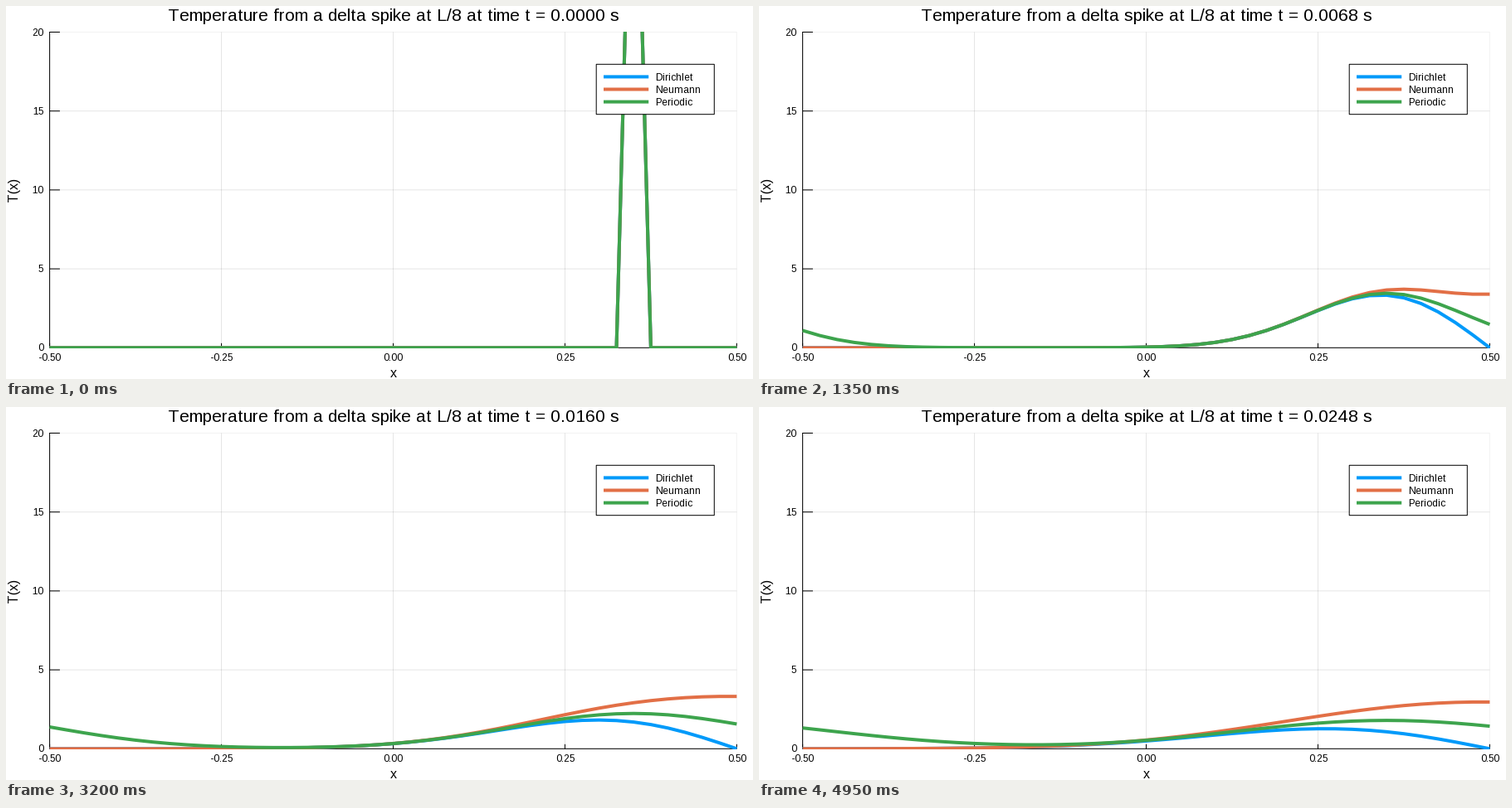
Write a matplotlib script that moves like this. It is 900 by 450 pixels and loops after 5000 ms.

```python
import numpy as np
import matplotlib.pyplot as plt
from matplotlib.animation import FuncAnimation
from matplotlib.patches import Rectangle

W, H, DPI = 900, 450, 72
FRAMES, INTERVAL = 100, 50
LEFT, RIGHT, TOP, BOTTOM = 52.6, 880.4, 31.5, 412.3
Y_MAX = 20
STEP = 0.00025          # simulated seconds per frame
POINTS, SPIKE = 41, 34
DX = 1 / (POINTS - 1)

TITLE, GUIDE, TICK = 21, 16, 12
SERIES = {"Dirichlet": "#009afa", "Neumann": "#e26f46", "Periodic": "#3da44d"}

# Whole-pixel letter advances without kerning.
plt.rcParams.update({
    "font.family": "Liberation Sans",
    "text.kerning_factor": 6,
    "text.hinting": "force_autohint",
    "text.hinting_factor": 1,
})


def px(x):
    return LEFT + (x + 0.5) * (RIGHT - LEFT)


def py(y):
    return BOTTOM - y / Y_MAX * (BOTTOM - TOP)


def laplacian(n, corner=-2, wrap=0):
    m = -2 * np.eye(n) + np.eye(n, k=1) + np.eye(n, k=-1)
    m[0, 0] = m[-1, -1] = corner
    m[0, -1] = m[-1, 0] = wrap
    return m / DX**2


def diffuse(matrix, start):
    """Return u(n), the unit spike after n Crank-Nicolson steps."""
    values, vectors = np.linalg.eigh(matrix)
    growth = (1 + values * STEP / 2) / (1 - values * STEP / 2)
    weights = vectors[start] / DX
    return lambda n: vectors @ (growth**n * weights)


inner = POINTS - 2
fixed = diffuse(laplacian(inner), SPIKE - 1)
closed = diffuse(laplacian(inner, corner=-1), SPIKE - 1)
ring = diffuse(laplacian(POINTS, wrap=1), SPIKE)

SOLVERS = {
    "Dirichlet": lambda n: np.pad(fixed(n), 1),
    "Neumann": lambda n: np.pad(closed(n), 1, mode="edge"),
    "Periodic": ring,
}

fig = plt.figure(figsize=(W / DPI, H / DPI), dpi=DPI, facecolor="white")
ax = fig.add_axes([0, 0, 1, 1])
ax.set_xlim(0, W)
ax.set_ylim(H, 0)
ax.axis("off")


def segment(x, y, color="black", width=1, **kw):
    return ax.plot(x, y, color=color, lw=width, snap=False,
                   solid_capstyle="butt", **kw)[0]


def label(x, y, text, size, ha="center", **kw):
    return ax.text(x, y, text, fontsize=size, ha=ha, va="baseline", **kw)


def draw_axes():
    for x in np.linspace(-0.5, 0.5, 5):
        alpha = 0.05 if x == 0.5 else 0.1
        segment([px(x)] * 2, [TOP, BOTTOM], alpha=alpha, zorder=1)
        segment([px(x)] * 2, [BOTTOM, BOTTOM - 5.5], zorder=2)
        label(px(x), 428, f"{x:.2f}", TICK)
    for y in range(0, Y_MAX + 1, 5):
        alpha = 0.05 if y == Y_MAX else 0.1
        segment([LEFT, RIGHT], [py(y)] * 2, alpha=alpha, zorder=1)
        segment([LEFT, LEFT + 12.3], [py(y)] * 2, zorder=2)
        label(45, py(y) + 4.2, str(y), TICK, ha="right")
    segment([LEFT] * 2, [TOP - 0.5, BOTTOM + 0.5], zorder=2)
    segment([LEFT, RIGHT], [BOTTOM] * 2, zorder=2)
    label(466.5, 448, "x", GUIDE)
    label(14.5, 221, "T(x)", GUIDE, rotation=90, rotation_mode="anchor")


def draw_legend():
    left, top, width, row_height = 711.2, 70.3, 142.1, 15.1
    ax.add_patch(Rectangle((left, top), width, 4 * row_height, fc="white",
                           ec="black", lw=1, snap=False, zorder=5))
    for row, (name, color) in enumerate(SERIES.items(), start=1):
        y = top + row_height * row
        segment([720, 774.2], [y, y], color, 4, zorder=6)
        label(782, y + 4.6, name, TICK, ha="left", zorder=6)


draw_axes()
draw_legend()
title = label(466.5, 18, "", TITLE)

xs = px(np.linspace(-0.5, 0.5, POINTS))
window = Rectangle((52, 31), 829, 382, transform=ax.transData)
lines = {}
for name, color in SERIES.items():
    lines[name] = segment(xs, xs * 0, color, 4, zorder=3,
                          solid_joinstyle="round")
    lines[name].set_clip_path(window)


def update(frame):
    for name, line in lines.items():
        line.set_ydata(py(SOLVERS[name](frame)))
    shown = (5 * frame + 1) // 2 / 10000   # rounds halves up
    title.set_text("Temperature from a delta spike at L/8 "
                   f"at time t = {shown:.4f} s")
    return [title, *lines.values()]


anim = FuncAnimation(fig, update, frames=FRAMES, interval=INTERVAL,
                     repeat=True, repeat_delay=0)
plt.show()
```
